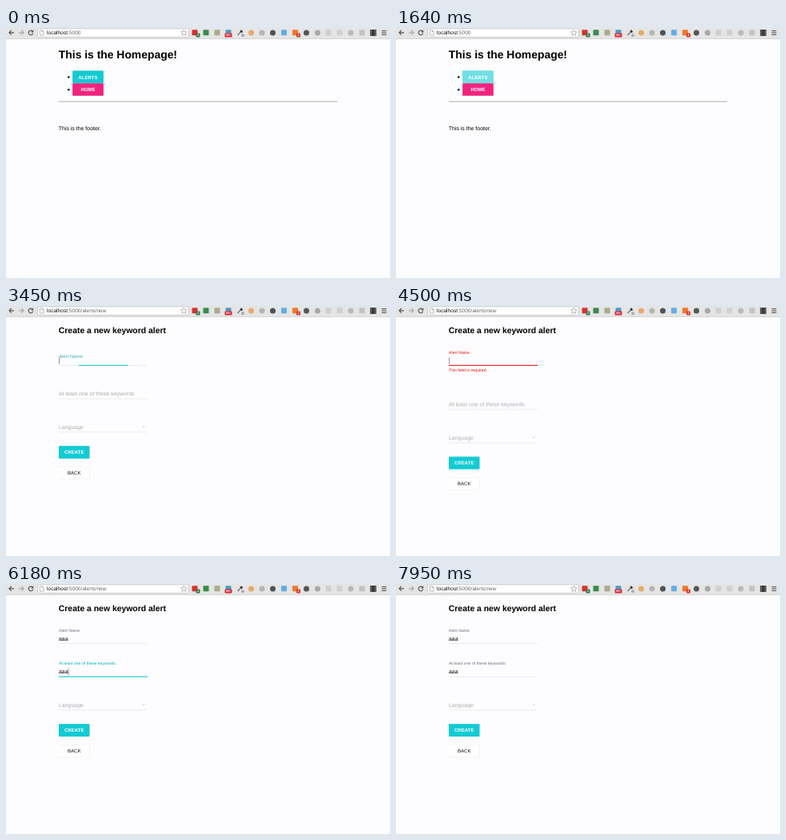
These frames come from a looping animation (480 by 313 pixels, 8000 ms). An HTML page:

```html
<!DOCTYPE html>
<html lang="en">
<head>
<meta charset="utf-8">
<title>Keyword alerts</title>
<style>
  html, body { margin: 0; width: 100%; height: 100%; overflow: hidden; background: #fdfcfe; }
  svg { display: block; width: 100vw; height: 100vh; }
  text { font: 6.95px "Liberation Sans", Arial, sans-serif; text-rendering: geometricPrecision; white-space: pre; }
  .h1 { font-size: 13.9px; font-weight: bold; }
  .h2 { font-size: 10.42px; font-weight: bold; }
  .url { font-size: 6.6px; fill: #666; }
  .small { font-size: 5.21px; }
  .badge { font-size: 3.6px; font-weight: bold; fill: #fff; text-anchor: middle; }
  .btn text { font-size: 6.08px; text-anchor: middle; fill: #111; }
  .btn rect { filter: drop-shadow(0 .5px .6px rgba(0,0,0,.2)); }
  .btn .tint { filter: none; fill: #fff; }
  .cyan text, .pink text { fill: #fff; font-weight: bold; }
  .white rect { fill: #fff; }
  .cyan rect { fill: #12cbd3; }
  .pink rect { fill: #f0247f; }
  .hint { fill: #acacae; }
  .rule { fill: #e0e0e2; }

  .cut { animation: 8s step-end infinite; }
  .ease { animation: 8s cubic-bezier(.23, 1, .32, 1) infinite; }
  .line { transform-box: fill-box; transform-origin: center; }

  .home { animation-name: home; }
  .list { animation-name: list; }
  .form { animation-name: form; }
  .btn .hover { animation-name: hover; }
  .shift { animation-name: shift; }
  .error { animation-name: error; fill: #e81010; }
  .label1 { animation-name: label1; }
  .label2 { animation-name: label2; }
  .line1 { animation-name: line1; }
  .line2 { animation-name: line2; }
  .typed1 { animation-name: typed1; }
  .typed2 { animation-name: typed2; }
  .caret1 { animation-name: caret1; }
  .caret2 { animation-name: caret2; }

  @keyframes home { 0% { opacity: 1 } 22%, 100% { opacity: 0 } }
  @keyframes list { 0% { opacity: 0 } 22% { opacity: 1 } 34.5%, 100% { opacity: 0 } }
  @keyframes form { 0% { opacity: 0 } 34.5%, 100% { opacity: 1 } }
  @keyframes hover { 0%, 7% { opacity: 0 } 12.625%, 100% { opacity: .4 } }
  @keyframes shift { 0% { transform: none } 51% { transform: translateY(13.4px) } 68.5%, 100% { transform: none } }
  @keyframes error { 0% { opacity: 0 } 51% { opacity: 1 } 68.5%, 100% { opacity: 0 } }

  @keyframes label1 {
    0%, 42.3% { transform: translate(66px, 70.6px) scale(1); fill: #acacae }
    47.925%, 51% { transform: translate(66px, 59.8px) scale(.75); fill: #00b4be }
    56.625%, 68.5% { transform: translate(66px, 59.8px) scale(.75); fill: #e81010 }
    74.125%, 100% { transform: translate(66px, 59.8px) scale(.75); fill: #727274 }
  }
  @keyframes label2 {
    0%, 68.5% { transform: translate(66px, 111.9px) scale(1); fill: #acacae }
    74.125%, 83.75% { transform: translate(66px, 100.9px) scale(.75); fill: #00b4be }
    89.375%, 100% { transform: translate(66px, 100.9px) scale(.75); fill: #727274 }
  }
  @keyframes line1 {
    0%, 42.3% { transform: scaleX(0); fill: #12cbd3 }
    47.925%, 51% { transform: scaleX(1); fill: #12cbd3 }
    56.625%, 68.5% { transform: scaleX(1); fill: #e81a1a }
    74.125%, 100% { transform: scaleX(0); fill: #12cbd3 }
  }
  @keyframes line2 {
    0%, 68.5% { transform: scaleX(0) }
    74.125%, 83.75% { transform: scaleX(1) }
    89.375%, 100% { transform: scaleX(0) }
  }
  @keyframes typed1 {
    0% { clip-path: inset(-2px 100% -2px 0) }
    60% { clip-path: inset(-2px 66.6% -2px 0) }
    61.75% { clip-path: inset(-2px 33.3% -2px 0) }
    63.5%, 100% { clip-path: inset(-2px -2px -2px 0) }
  }
  @keyframes typed2 {
    0% { clip-path: inset(-2px 100% -2px 0) }
    72.5% { clip-path: inset(-2px 66.6% -2px 0) }
    74.25% { clip-path: inset(-2px 33.3% -2px 0) }
    75.75%, 100% { clip-path: inset(-2px -2px -2px 0) }
  }
  @keyframes caret1 {
    0% { opacity: 0; transform: none }
    42.25% { opacity: 1; transform: none }
    48.5% { opacity: 0; transform: none }
    54.75% { opacity: 1; transform: none }
    60% { opacity: 1; transform: translateX(3.9px) }
    61.75% { opacity: 1; transform: translateX(7.7px) }
    63.5% { opacity: 1; transform: translateX(11.6px) }
    68.5%, 100% { opacity: 0; transform: none }
  }
  @keyframes caret2 {
    0% { opacity: 0; transform: none }
    68.5% { opacity: 1; transform: none }
    72.5% { opacity: 1; transform: translateX(3.9px) }
    74.25% { opacity: 1; transform: translateX(7.7px) }
    75.75% { opacity: 1; transform: translateX(11.6px) }
    82%, 100% { opacity: 0; transform: none }
  }
</style>
</head>
<body>
<svg id="stage" viewBox="0 0 480 313" preserveAspectRatio="none"></svg>
<script>
const text = (x, y, s, cls = '') => `<text x="${x}" y="${y}" class="${cls}">${s}</text>`;
const rect = (x, y, w, h, attrs = '') => `<rect x="${x}" y="${y}" width="${w}" height="${h}" ${attrs}/>`;
const path = (d, attrs) => `<path d="${d}" fill="none" ${attrs}/>`;
const dot = (x, y, r, fill) => `<circle cx="${x}" cy="${y}" r="${r}" fill="${fill}"/>`;

const button = (x, y, w, label, kind, extra = '') =>
  `<g class="btn ${kind}">${rect(x, y, w, 15.6, 'rx=".9"')}${extra}${text(x + w / 2, y + 10, label)}</g>`;
const bullets = dot(78.3, 61.6, 1.25, '#000') + dot(78.3, 77.2, 1.25, '#000');
const badge = (x, s, fill, w = 5) => rect(x, 6.5, w, 5, `rx="1" fill="${fill}"`) + text(x + w / 2, 10.4, s, 'badge');

function toolbar() {
  // [shape, centre x, colour]
  const icons = [
    ['sq', 236, '#d6322f'], ['sq', 250, '#3c8a4c'], ['sq', 264, '#a9ab8c'], ['sq', 278, '#4b9bc4'],
    ['dot', 306.5, '#e9a96a'], ['dot', 320, '#b5b5b5'], ['dot', 333.5, '#4d5257'], ['sq', 347.5, '#62aee8'],
    ['sq', 361.5, '#f0772b'], ['dot', 375.5, '#555'], ['dot', 389.5, '#a8a8a8'], ['sq', 403, '#cfcfcf'],
    ['sq', 417, '#d0d0d0'], ['dot', 431, '#b9b9b9'], ['sq', 445, '#c3c3c3']
  ];
  const marks = icons.map(([shape, x, fill]) => shape === 'sq'
    ? rect(x - 3.5, 2.3, 7, 7, `rx=".8" fill="${fill}"`)
    : dot(x, 5.9, 3.5, fill)).join('');
  let film = rect(455, 2, 8, 8, 'fill="#3c3c3c"');
  for (let i = 0; i < 4; i++) {
    film += rect(455.6, 2.6 + i * 2, 1, 1, 'fill="#ddd"') + rect(461.4, 2.6 + i * 2, 1, 1, 'fill="#ddd"');
  }
  const menu = [3, 5.4, 7.8].map(y => rect(469.6, y, 5.8, 1.1, 'fill="#555"')).join('');
  return rect(0, 0, 480, 13, 'fill="#e5e5e5"') + rect(0, 13, 480, .8, 'fill="#cdcdcd"') +
    path('M10 5.8H4M6.7 3 4 5.8 6.7 8.6', 'stroke="#555" stroke-width="1.2"') +
    path('M16 5.8H22M19.3 3 22 5.8 19.3 8.6', 'stroke="#aaa" stroke-width="1.2"') +
    path('M33 4A2.8 2.8 0 1 0 33.7 6.6', 'stroke="#555" stroke-width="1.2"') +
    '<path d="M34.3 2.3v3.2h-3.2z" fill="#555"/>' +
    rect(39.5, .8, 189, 10.6, 'rx="1.2" fill="#fff" stroke="#bcbcbc" stroke-width=".7"') +
    path('M42.4 2.9h3l1.6 1.6v4.6h-4.6zM45.4 2.9v1.6h1.6', 'stroke="#888" stroke-width=".6"') +
    path('M222.3 2.2l1.1 2.5 2.7.2-2.1 1.8.7 2.6-2.4-1.4-2.4 1.4.7-2.6-2.1-1.8 2.7-.2z', 'stroke="#888" stroke-width=".6"') +
    '<text x="51" y="8.2" class="url"><tspan fill="#111">localhost</tspan>:5000</text>' +
    marks + badge(237.5, '2', '#34764a') + badge(273.5, '99+', '#d8283a', 9) + badge(363, '2', '#d23a2a') +
    path('M289.5 9 294 4.3', 'stroke="#777" stroke-width="1.4"') +
    path('M293.2 3.2 295.4 5.4', 'stroke="#333" stroke-width="2.4"') +
    dot(296, 9.3, 2, '#aaa') + film + menu;
}

const home = () => '<g class="cut home">' +
  text(65.8, 38.4, 'This is the Homepage!', 'h1') + bullets +
  button(83.2, 69.2, 38.6, 'HOME', 'pink') +
  button(83.2, 53.5, 38.6, 'ALERTS', 'cyan', rect(83.2, 53.5, 38.6, 15.6, 'rx=".9" class="tint ease hover"')) +
  rect(66, 91.6, 348, .9, 'fill="#a4a4a4"') +
  text(65.8, 127.5, 'This is the footer.') + '</g>';

function list() {
  const names = ['aaabertrand vermolle', 'Alerte ICN ou ICNbs', 'Oltevi', 'oltevi non admin', 'oltevi, @oltevi',
    'CM2', 'CM3', 'cuma', 'cuma2', 'erwegsdfgwergsdg'];
  const rows = names.map((name, i) => {
    const y = i * 20.87;
    return text(73, 106.4 + y, name) + button(361.4, 99 + y, 38.6, 'DELETE', 'white');
  }).join('');
  return '<g class="cut list">' + text(93.6, 8.2, '/alerts', 'url') +
    text(65.8, 38.4, 'This is Alerts List page', 'h1') + bullets +
    button(83.2, 69.2, 68.6, 'REFRESH ALERTS', 'cyan') +
    button(83.2, 53.5, 75.6, 'CREATE NEW ALERT', 'white') +
    '<clipPath id="box"><rect x="66" y="92" width="348" height="208.6"/></clipPath>' +
    `<g clip-path="url(#box)">${rows}</g>` +
    rect(66.3, 92, 347.3, 208.8, 'rx="1" fill="none" stroke="#cfcfcf" stroke-width=".9"') +
    rect(408.4, 93.6, 3.8, 204.4, 'rx="1.5" fill="#bcbcbc"') + '</g>';
}

const field = (n, y) =>
  `<text class="ease label${n}">${n === 1 ? 'Alert Name' : 'At least one of these keywords'}</text>` +
  text(66, y - 3.2, 'aaa', `cut typed${n}`) +
  rect(66, y - 9.8, .6, 8.6, `class="cut caret${n}" fill="#555"`) +
  rect(66, y + .2, 111.2, .6, 'class="rule"') +
  rect(66, y - .1, 111.2, 1.1, `class="ease line line${n}" fill="#12cbd3"`);

const form = () => '<g class="cut form">' + text(93.6, 8.2, '/alerts/new', 'url') +
  text(65.8, 33.9, 'Create a new keyword alert', 'h2') +
  field(1, 73.9) + text(66, 82.1, 'This field is required', 'small cut error') +
  '<g class="cut shift">' + field(2, 115.6) +
  text(66, 154.1, 'Language', 'hint') +
  '<path d="M170.3 150.5h3.6l-1.8 1.8z" fill="#d0d0d2"/>' +
  rect(66, 157.6, 111.2, .6, 'class="rule"') +
  button(66, 175.3, 38.4, 'CREATE', 'cyan') +
  button(66, 201.2, 38.4, 'BACK', 'white') + '</g></g>';

document.getElementById('stage').innerHTML = toolbar() + home() + list() + form();
</script>
</body>
</html>
```
